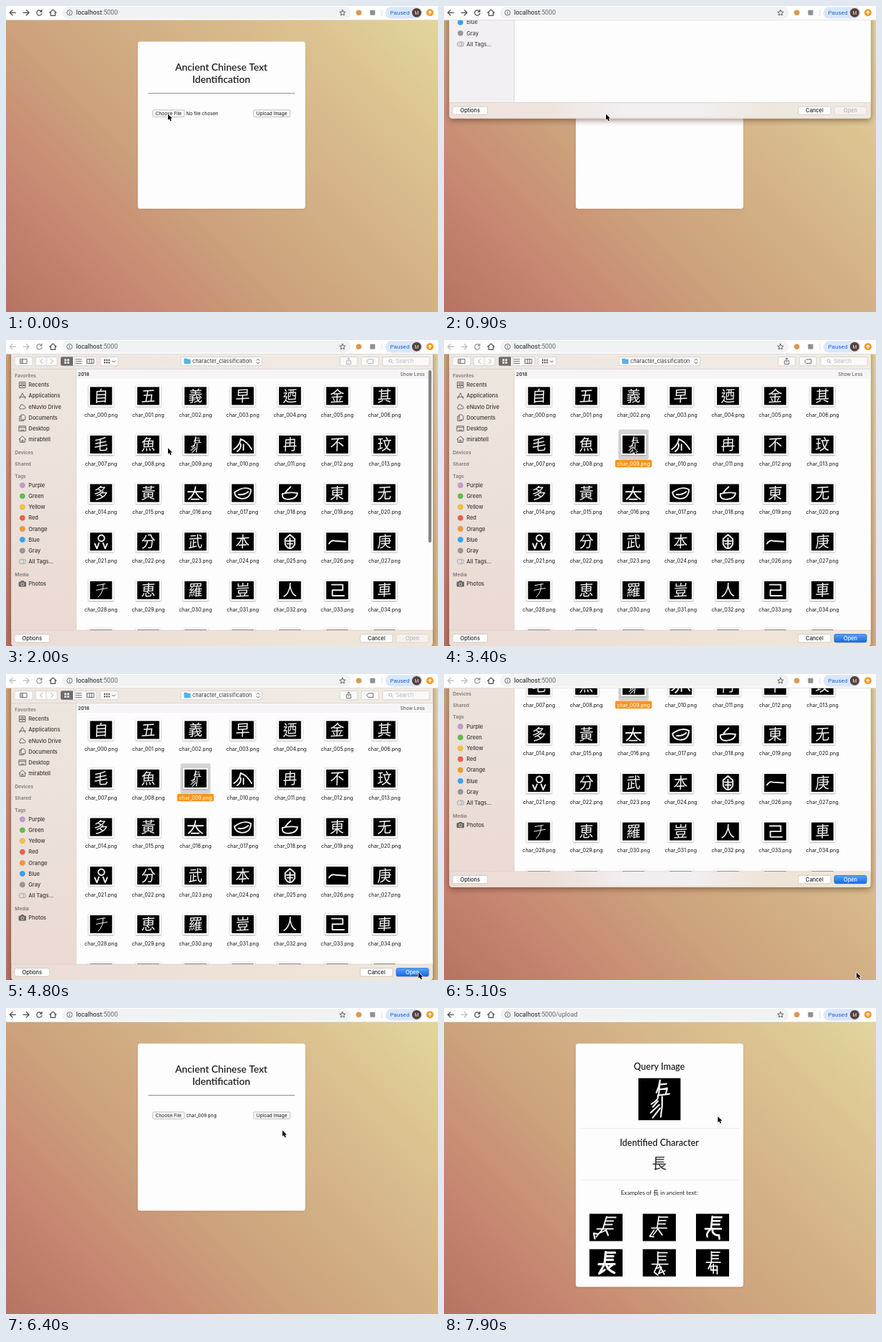
Write an HTML page with a canvas that moves like this. It is 600 px wide and 426 px high and loops after 8 s.

```html
<!DOCTYPE html>
<html lang="en">
<head>
<meta charset="utf-8">
<title>Ancient Chinese Text Identification</title>
<style>
html, body { margin: 0; width: 100%; height: 100%; overflow: hidden; background: #fff; }
canvas { display: block; width: 600px; height: 426px; }
</style>
</head>
<body>
<canvas id="stage"></canvas>
<script>
const W = 600, H = 426, LOOP = 8000, STEP = 100;
const canvas = document.getElementById('stage');
const dpr = window.devicePixelRatio || 1;
canvas.width = W * dpr;
canvas.height = H * dpr;
const ctx = canvas.getContext('2d');

const UI = 'Inter, "Open Sans", sans-serif';
const TITLE = 'Lato, "Noto Sans CJK TC", "Noto Sans CJK SC", "Noto Sans CJK", sans-serif';
const CJK = '"Noto Sans CJK TC", "Noto Sans CJK SC", "Noto Sans CJK JP", "Noto Sans CJK", sans-serif';

// ---------- helpers ----------
function box(x, y, w, h, r, fill, stroke, lw = 0.7) {
  ctx.beginPath();
  ctx.roundRect(x, y, w, h, r);
  if (fill) { ctx.fillStyle = fill; ctx.fill(); }
  if (stroke) { ctx.strokeStyle = stroke; ctx.lineWidth = lw; ctx.stroke(); }
}
function dot(x, y, r, fill, stroke, lw = 0.8) {
  box(x - r, y - r, 2 * r, 2 * r, r, fill, stroke, lw);
}
function path(d, x, y, color, lw = 1, sx = 1, sy = sx) {
  ctx.save();
  ctx.translate(x, y);
  ctx.scale(sx, sy);
  ctx.strokeStyle = color;
  ctx.lineWidth = lw / Math.max(sx, sy);
  ctx.lineCap = ctx.lineJoin = 'round';
  ctx.stroke(new Path2D(d));
  ctx.restore();
}
function text(s, x, y, size, color, { font = UI, weight = 400, align = 'left' } = {}) {
  ctx.font = `${weight} ${size}px ${font}`;
  ctx.fillStyle = color;
  ctx.textAlign = align;
  ctx.textBaseline = 'alphabetic';
  ctx.fillText(s, x, y + size * 0.36);
  return ctx.measureText(s).width;
}
function heading(s, y, size) {
  text(s, 299, y, size, '#111', { font: TITLE, weight: 500, align: 'center' });
}
function shadow(color, blur, dy) {
  ctx.shadowColor = color;
  ctx.shadowBlur = blur * dpr;
  ctx.shadowOffsetY = dy * dpr;
}
function ramp(x0, y0, x1, y1, ...colors) {
  const g = ctx.createLinearGradient(x0, y0, x1, y1);
  colors.forEach((c, i) => g.addColorStop(i / (colors.length - 1), c));
  return g;
}
const clamp = v => Math.max(0, Math.min(1, v));

// ---------- web page ----------
function backdrop() {
  ctx.fillStyle = ramp(48.5, 474.5, 551.5, -28.5, '#b67362', '#c78772', '#cca17b', '#d3b186', '#dbc290', '#e2d59d');
  ctx.fillRect(0, 19, W, H - 19);
}
function card(h) {
  ctx.save();
  shadow('rgba(90,50,30,.18)', 3, 1);
  box(183, 49.5, 232.7, h, 3.5, '#fefdfe');
  ctx.restore();
}
function pageButton(label, x, w, pressed) {
  box(x, 144.8, w, 9.6, 1.8, pressed ? '#cfcfd2' : '#fafafa', '#a3a3a6', 0.7);
  text(label, x + w / 2, 149.7, 6.5, '#111', { align: 'center' });
}
function formPage(t) {
  card(232.7);
  heading('Ancient Chinese Text', 84.7, 13.8);
  heading('Identification', 101.7, 13.8);
  ctx.fillStyle = '#858184';
  ctx.fillRect(197.5, 121, 203.5, 0.9);
  pageButton('Choose File', 203.8, 44, t === 400);
  text(t < 5400 ? 'No file chosen' : 'char_009.png', 250.3, 149.7, 6.5, '#111');
  pageButton('Upload Image', 343.8, 50.8, t >= 7100 && t < 7300);
}

const QUERY = 'M30 3Q29 12 25 20M30 3L28 24M29 9L39 8M29 16L40 14M27 24L43 22M40 14L38 22M27 24Q29 30 18 36M33 26V38L31 54M27 32L20 40M29 37L17 48M30 42L20 55';
const COMB = 'M21 4V21M21 5H34M21 10H32M21 15H32M13 21H35';
// tail strokes, shear, scale, offset, line width
const EXAMPLES = [
  ['M21 21L15 32M15 28L10 27L14 35M16 28L26 23L31 30', -0.3, 1, 4, 2],
  ['M23 21L17 31M17 24L12 33L18 34M23 23L30 31', -0.15, 0.95, 3, 1.8],
  ['M21 21Q14 27 17 32M23 21Q23 30 33 30L34 35', -0.1, 1, 2, 2.6],
  ['M21 21L15 34L22 29M23 21Q27 30 36 33M32 22L26 27', -0.1, 1, 2, 3.2],
  ['M21 21L16 32L21 36M23 22L30 35M18 27L26 25L22 34L31 30', 0, 1, 0, 1.8],
  ['M21 21L16 31M24 24V38M20 27H30V33H20ZM30 27V39', 0, 0.88, 3, 1.8]
];
function resultPage() {
  card(338.7);
  heading('Query Image', 81, 12.5);
  ctx.fillStyle = '#000';
  ctx.fillRect(270, 97.7, 58.5, 58.5);
  path(QUERY, 270, 97.7, '#f4f4f4', 2.2);
  ctx.fillStyle = '#ebe9eb';
  ctx.fillRect(190, 167.3, 220, 0.9);
  ctx.fillRect(190, 238.8, 220, 0.9);
  heading('Identified Character', 187, 12.5);
  text('長', 299, 217, 20.5, '#2a2a2a', { font: CJK, align: 'center' });
  text('Examples of 長 in ancient text:', 299, 257.5, 8, '#222', { font: TITLE, align: 'center' });
  EXAMPLES.forEach(([tail, shear, k, dx, lw], i) => {
    const x = 202 + (i % 3) * 74, y = i < 3 ? 286.4 : 335.7;
    ctx.save();
    ctx.beginPath();
    ctx.rect(x, y, 46, 38);
    ctx.fillStyle = '#000';
    ctx.fill();
    ctx.clip();
    ctx.transform(1, 0, shear, 1, x + dx, y);
    path(COMB + tail, 0, 0, '#f4f4f4', lw, k);
    ctx.restore();
  });
}

// ---------- file sheet ----------
const GLYPHS = [...'自五義早迺金其毛魚長介冉不玟多黃大皿白東无兄分武本囿一庚子恵羅豈人己車口木女月王四田'];
// old forms drawn by hand in a 32 by 26 field
const STROKES = {
  10: 'M3 20Q12 14 13 5Q22 8 29 20M13 12Q14 19 8 23M17 13V21',
  16: 'M5 11H27M16 4Q15 15 6 22M16 11Q19 18 26 22M10 22H21',
  17: 'M4 12Q18 2 28 8Q27 22 14 21Q5 20 4 12M10 15Q18 16 24 11',
  18: 'M17 4Q12 8 9 13M5 14Q4 23 15 22T27 13Q16 11 5 14',
  21: 'M12 8a4.5 4.5 0 1 0 9 0a4.5 4.5 0 1 0-9 0M7 16L10 23L13 15M19 15L22 23L25 16',
  25: 'M16 3L9 9V17Q16 29 23 17V9ZM11 12H21M16 8V21M12 16H20',
  26: 'M4 16Q8 10 13 12L28 13',
  28: 'M10 6L22 4M19 4Q20 15 12 23M9 13L25 10',
  33: 'M8 5H24V13H9V21H26'
};
const PIC = { w: 30.6, h: 25 };
function glyph(i, x, y) {
  const ink = '#f2f2f2', left = x - PIC.w / 2, top = y - PIC.h / 2;
  if (i === 9) path(QUERY, left, top, ink, 1.2, PIC.w / 58, PIC.h / 58);
  else if (STROKES[i]) path(STROKES[i], left, top, ink, i === 28 ? 1 : 1.9, PIC.w / 32, PIC.h / 26);
  else {
    ctx.save();
    ctx.transform(0.92, -0.05, -0.04, 1, x, y);
    text(GLYPHS[i], 0, 0, 21.5, ink, { font: CJK, weight: 500, align: 'center' });
    ctx.restore();
  }
}
function thumb(i, selected) {
  const x = 132 + (i % 7) * 65.6, y = 77.9 + Math.floor(i / 7) * 67.6;
  if (selected) box(x - 21, y - 21, 42, 42, 3, '#d5d3d5');
  ctx.save();
  shadow('rgba(0,0,0,.4)', 1.8, 0.6);
  box(x - 17.6, y - 14.8, 35.2, 29.6, 0.6, '#fff');
  ctx.restore();
  ctx.fillStyle = '#000';
  ctx.fillRect(x - PIC.w / 2, y - PIC.h / 2, PIC.w, PIC.h);
  glyph(i, x, y);

  const name = `char_${String(i).padStart(3, '0')}.png`;
  if (selected) box(x - 25.5, y + 21.2, 51, 10.6, 2, '#f6951f');
  text(name, x, y + 26.7, 7.1, selected ? '#fff' : '#111', { align: 'center' });
}

const PLACES = ['Recents', 'Applications', 'eNuvlo Drive', 'Documents', 'Desktop', 'mirabtell'];
const TAGS = [['Purple', '#c39bd3'], ['Green', '#5fbf4a'], ['Yellow', '#f8c13c'], ['Red', '#ee5f47'],
  ['Orange', '#f39a2b'], ['Blue', '#35a3f4'], ['Gray', '#98969a']];
const PLACE_ICONS = [
  'M-4 -4H4V4H-4ZM-4 1H-1L0 2.5L1 1H4M-2.5 -2H2.5M-2.5 0H2.5',
  'M-4 4L0 -4L4 4M-4.5 1.5H4.5',
  'M-3 3H3Q5 2 4 0Q3 -1 2 -1Q1 -4 -2 -3Q-3 -2 -3 0Q-6 1 -3 3Z',
  'M-1.5 -4H2L4 -2V3H-1.5ZM-1.5 -2H-4V4.5H1.5V3',
  'M-4.5 -3.5H4.5V3.5H-4.5ZM-4.5 -1.5H4.5M-2 2H2',
  'M-5 0L0 -4.5L5 0M-3.5 -1V4H3.5V-1M-1 4V1H1V4'
];
const ROW = 15.17;
function sidebar(early) {
  const label = early ? '#4b494b' : '#3d3836', icon = '#6b6765';
  const head = (s, y) => text(s, 12.3, y, 6.6, '#7c7674', { weight: 600 });
  const item = (s, y) => text(s, 31.3, y, 7.4, label, { weight: 500 });
  head('Favorites', early ? 50 : 49.3);
  PLACES.forEach((s, i) => {
    const y = 62.6 + i * ROW;
    item(s, y);
    path(PLACE_ICONS[i], 22.8, y, icon, 1);
  });
  head('Devices', 157);
  if (!early) head('Shared', 173);
  const tagTop = early ? 203.4 : 189.2, mediaTop = early ? 173 : 326.5;
  head('Tags', tagTop);
  TAGS.forEach(([s, c], i) => {
    const y = tagTop + 13 + i * ROW;
    item(s, y);
    dot(22.8, y, 3.7, c, 'rgba(0,0,0,.12)', 0.6);
  });
  const last = tagTop + 13 + 7 * ROW;
  item('All Tags...', last);
  dot(24.3, last, 3.3, '#dedadb', '#999', 0.7);
  dot(21.5, last, 3.3, '#dedadb', '#999', 0.7);
  head('Media', mediaTop);
  const py = mediaTop + (early ? 12.3 : 13);
  item('Photos', py);
  box(17.6, py - 3, 10.4, 7, 1, icon);
  box(20.5, py - 4.4, 4.6, 2.5, 0.6, icon);
  dot(22.8, py + 0.5, 1.9, null, '#eee', 0.7);
}

function toolbar(early, chosen) {
  const ink = early ? '#b3b1b3' : '#5d5958', pale = '#aaa7a7', action = chosen ? ink : pale;
  const face = early ? '#f6f4f5' : '#fcfaf9', edge = early ? '#dedbdd' : '#cdc7c4';
  [[12, 25], [41, 30], [76, 50], [131, 25], [243, 112.5], [464, 24], [493.5, 24], [523, 65]]
    .forEach(([x, w]) => box(x, 23.6, w, 12.2, 2, face, edge, 0.7));
  path('M0 0H9V6H0ZM3 0V6M1 2H2M1 4H2', 20, 26.7, ink, 0.9);
  path('M3 -2.8L0 0L3 2.8', 47.5, 29.7, pale, 1);
  path('M0 -2.8L3 0L0 2.8', 62.5, 29.7, pale, 1);
  path('M0 -6V6', 56, 29.7, edge, 0.7);
  box(76, 23.6, 17, 12.2, [2, 0, 0, 2], early ? '#dcdadb' : '#6f6b6b');
  for (let i = 0; i < 4; i++) {
    box(81.2 + (i % 2) * 3.9, 26.5 + (i >> 1) * 3.7, 2.7, 2.7, 0.3, early ? '#a9a7a9' : '#fff');
  }
  path('M0 0H8M0 2.9H8M0 5.8H8', 97, 26.8, ink, 0.9);
  path('M0 0H9V6H0ZM3 0V6M6 0V6', 113, 26.7, ink, 0.9);
  path('M-7 -6V6M9 -6V6', 102.5, 29.7, edge, 0.6);
  for (let i = 0; i < 6; i++) box(136 + (i % 3) * 3.1, 27 + (i > 2 ? 3.3 : 0), 2.1, 2.1, 0.3, ink);
  path('M0 0L2 2L4 0', 147.5, 29, ink, 1);
  box(247.3, 25.7, 4.5, 3, 0.8, '#4aa9e0');
  box(247.3, 26.7, 9, 6.6, 0.8, early ? '#7cc4ec' : '#53b2e8');
  text('character_classification', 259, 29.7, 7.4, early ? '#b5b3b5' : '#3f3b3a');
  path('M0 -1.3L2 -3.4L4 -1.3M0 1.3L2 3.4L4 1.3', 348, 29.7, ink, 0.9);
  path('M-1.5 -1H-3V4H3V-1H1.5M0 1.5V-4.5M-1.6 -3L0 -4.6L1.6 -3', 476, 29.7, action, 0.9);
  path('M-4.5 0L-2 -2.8H4.5V2.8H-2Z', 505.5, 29.7, action, 0.9);
  dot(534, 29, 2, null, pale, 0.8);
  path('M0 0L2 2', 535.4, 30.4, pale, 0.8);
  text('Search', 541.5, 29.7, 7.4, '#b8b5b6');
}

function sheetButton(s, x, w, mode) {
  const blue = mode === 'blue', off = mode === 'off';
  box(x, 409.6, w, 11.3, 2.2, blue ? ramp(0, 409, 0, 421, '#5aa5f8', '#1668e6') : off ? '#f6f1ee' : '#fff',
    blue ? '#1d66d2' : off ? '#d9d0cb' : '#c3bab5', 0.7);
  text(s, x + w / 2, 415.2, 7.4, blue ? '#fff' : off ? '#b9b4b2' : '#222', { align: 'center', weight: 500 });
}

function sheet(t) {
  const offset = t < 3000
    ? -406 * (1 - clamp((t - 850) / 270)) ** 2
    : -406 * clamp((t - 4959) / 250) ** 2;
  if (offset <= -406) return;
  const early = t < 1300, chosen = t >= 2700;
  ctx.save();
  ctx.beginPath();
  ctx.rect(0, 19.5, W, H);
  ctx.clip();
  ctx.translate(0, offset);
  ctx.save();
  shadow('rgba(50,20,10,.5)', 8, 2.5);
  box(7.5, 0, 585, 426, [0, 0, 4, 4], '#ede4de');
  ctx.restore();
  box(7.5, 0, 585, 426, [0, 0, 4, 4],
    early ? ramp(7, 0, 592, 0, '#efe3de', '#efe9df') : ramp(7, 0, 592, 0, '#ebddd7', '#eee1d6', '#efe7d8'));
  // the white card glows through the translucent bottom bar
  ctx.globalAlpha = 0.75 * clamp((-offset - 100) / 25);
  ctx.fillStyle = ramp(150, 0, 450, 0, 'rgba(243,243,248,0)', '#f3f3f8', '#f3f3f8', 'rgba(243,243,248,0)');
  ctx.fillRect(150, 404, 300, 20);
  ctx.globalAlpha = 1;

  ctx.fillStyle = early ? '#f4f2f3' : ramp(7, 0, 592, 0, '#ede6e1', '#f1ebe4');
  ctx.fillRect(7.5, 0, 585, 40.5);
  ctx.fillStyle = early ? '#f2f0f2' : ramp(0, 40, 0, 404, '#ece5de', '#ebe1da', '#ebdad3');
  ctx.fillRect(7.5, 40.5, 90, 363.5);
  ctx.fillStyle = '#fefdfe';
  ctx.fillRect(97.5, 40.5, 495, 363.5);
  toolbar(early, chosen);
  sidebar(early);

  if (!early) {
    ctx.save();
    ctx.beginPath();
    ctx.rect(97.5, 40.5, 495, 363.5);
    ctx.clip();
    ctx.fillStyle = '#f6f4f6';
    ctx.fillRect(97.5, 40.5, 495, 13.3);
    text('2018', 100, 47.3, 6.7, '#333', { weight: 600 });
    text('Show Less', 581.5, 47.3, 6.6, '#666', { align: 'right', weight: 500 });
    GLYPHS.forEach((g, i) => thumb(i, chosen && i === 9));
    const fade = 1 - clamp((t - 2200) / 400);
    if (fade) box(586.7, 42, 4.2, 240, 2.1, `rgba(110,110,112,${0.85 * fade})`);
    ctx.restore();
  }
  ctx.fillStyle = '#d6cfcb';
  ctx.fillRect(7.5, 40, 585, 0.7);
  ctx.fillRect(97, 40, 0.7, 364);
  ctx.fillRect(7.5, 403.7, 585, 0.7);
  sheetButton('Options', 12, 48.5);
  sheetButton('Cancel', 492, 45);
  sheetButton('Open', 542, 45, chosen ? 'blue' : 'off');
  ctx.restore();
}

// ---------- browser bar ----------
function browserBar(t) {
  const away = t >= 1200 && t < 5400, done = t >= 7900, loading = t >= 7200 && !done;
  const dark = '#4a4c50', pale = '#b9bbbe';
  ctx.fillStyle = '#fefefe';
  ctx.fillRect(0, 0, W, 19.5);
  ctx.fillStyle = '#dcd8d4';
  ctx.fillRect(0, 19.2, W, 0.6);
  const nav = away ? pale : dark;
  path('M4 0H-4M-0.3 -3.7L-4 0L-0.3 3.7', 9.3, 9.3, nav, 1.3);
  path('M-4 0H4M0.3 -3.7L4 0L0.3 3.7', 28, 9.3, done ? pale : nav, 1.3);
  if (loading) path('M-3 -3L3 3M3 -3L-3 3', 46.3, 9.3, dark, 1.3);
  else path('M3.1 -1.6A3.6 3.6 0 1 0 3.5 1M3.5 -4V-1.2H0.8', 46.3, 9.3, away ? '#8f9195' : dark, 1.2);
  path('M-4.5 0L0 -4.2L4.5 0M-3.1 -1V4H3.1V-1', 65.2, 9.3, dark, 1.2);

  box(78, 1, 401, 16.8, 8.4, '#f1f2f4');
  dot(88.3, 9.3, 3.7, null, '#5f6368', 0.9);
  path('M0 -0.4V1.9M0 -1.9V-1.8', 88.3, 9.3, '#5f6368', 0.9);
  const url = 'Roboto, sans-serif';
  const w = text('localhost', 97.3, 9.3, 8.8, '#222', { font: url });
  text(done ? ':5000/upload' : ':5000', 97.3 + w, 9.3, 8.8, '#666a6e', { font: url });

  path('M0 -4L1.2 -1.3L4 -1.1L1.9 0.8L2.5 3.6L0 2.1L-2.5 3.6L-1.9 0.8L-4 -1.1L-1.2 -1.3Z', 467.4, 9.4, dark, 0.9);
  dot(490, 9.3, 3.8, '#dd9650');
  box(505.6, 5.8, 7, 7, 0.8, '#8d9094');
  ctx.fillStyle = '#d5d7da';
  ctx.fillRect(521.6, 4.5, 0.8, 9.5);
  box(527, 1.3, 51.5, 16.2, 8.1, '#dae6fb');
  text('Paused', 533.5, 9.4, 8.1, '#1d66d0', { font: url, weight: 400 });
  dot(570.3, 9.3, 6.4, '#58403a');
  text('M', 570.3, 9.3, 6.6, '#eee', { font: url, align: 'center' });
  dot(588.8, 9.3, 5, '#f29a1f');
  path('M0 2.2V-2M-1.9 -0.2L0 -2.2L1.9 -0.2', 588.8, 9.3, '#fff', 1.2);
}

// ---------- pointer ----------
const MOVES = [[0, 225, 150.5], [2200, 225, 150.5], [2600, 262.5, 149.5], [3600, 262.5, 149.5], [4400, 573, 415.5],
  [5700, 573, 415.5], [6300, 384, 170.5], [6600, 384, 170.5], [7000, 380.3, 151], [8000, 380.3, 151]];
function pointer(t) {
  const i = MOVES.findIndex(m => m[0] > t);
  const [t0, x0, y0] = MOVES[i - 1], [t1, x1, y1] = MOVES[i];
  const p = (t - t0) / (t1 - t0), e = p * p * (3 - 2 * p);
  ctx.save();
  ctx.translate(x0 + (x1 - x0) * e, y0 + (y1 - y0) * e);
  const arrow = new Path2D('M0 0V8.2L1.9 6.5L3.3 9.7L4.8 9.1L3.4 6H6Z');
  ctx.lineJoin = 'round';
  ctx.strokeStyle = '#fff';
  ctx.lineWidth = 1.3;
  ctx.stroke(arrow);
  ctx.fillStyle = '#000';
  ctx.fill(arrow);
  ctx.restore();
}

function draw(now) {
  const t = Math.floor((now % LOOP) / STEP) * STEP;
  ctx.setTransform(dpr, 0, 0, dpr, 0, 0);
  backdrop();
  if (t < 7900) formPage(t);
  else resultPage();
  sheet(t);
  browserBar(t);
  pointer(t);
}

let start;
function tick(now) {
  start ??= now;
  draw(now - start);
  requestAnimationFrame(tick);
}
draw(0);
requestAnimationFrame(tick);
</script>
</body>
</html>
```
